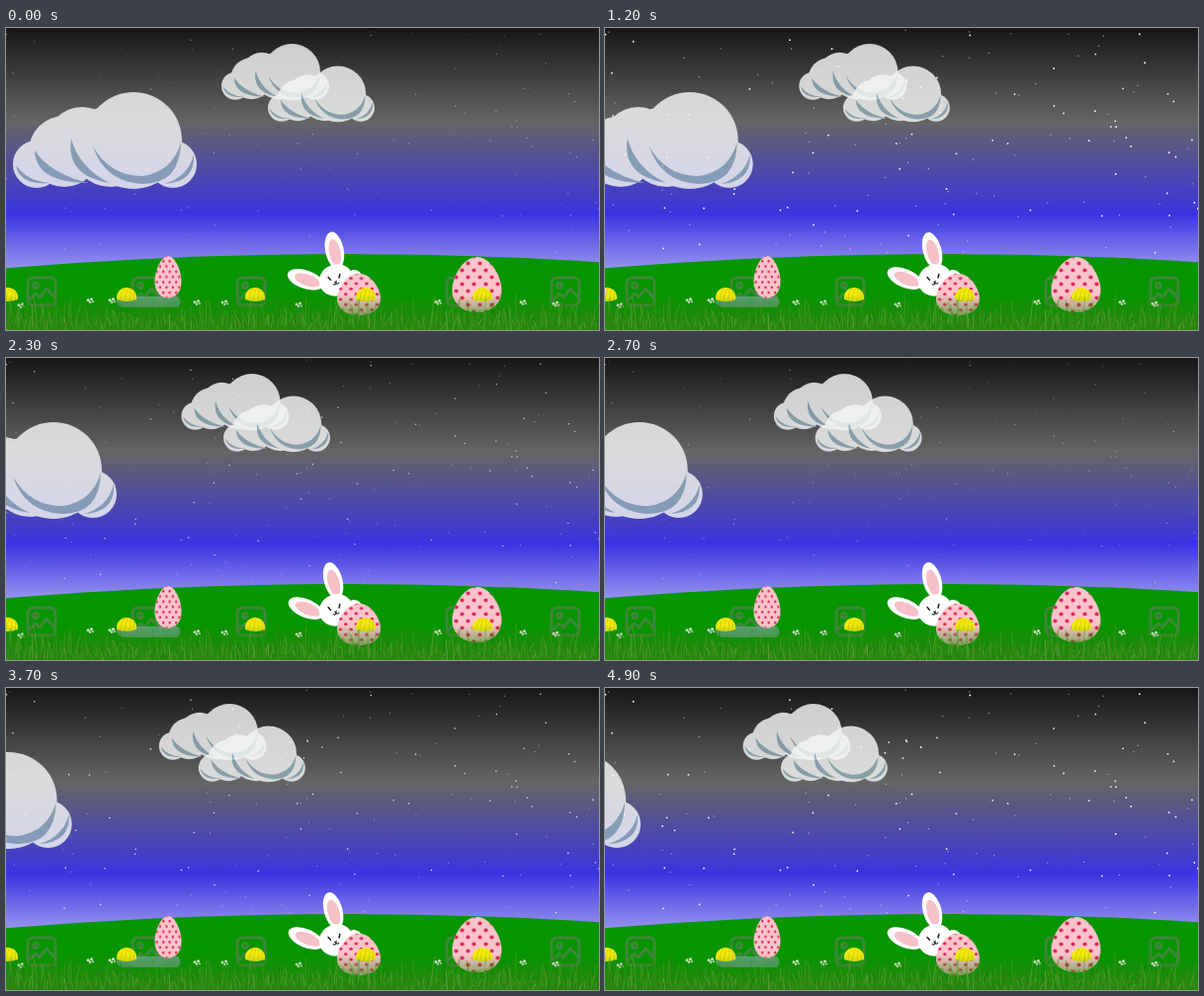
An HTML page that plays this animation: 600x306 px, repeating every 5 s.

```html
<!DOCTYPE html>
<html lang="en">
<head>
<meta charset="utf-8">
<title>Spring night meadow</title>
<style>
  html, body { margin: 0; width: 100%; height: 100%; overflow: hidden; }
  svg { display: block; width: 600px; height: 306px; }
</style>
</head>
<body>
<svg viewBox="0 0 600 306">
  <defs>
    <linearGradient id="sky" x2="0" y2="1">
      <stop stop-color="#181518"/>
      <stop offset=".31" stop-color="#656565"/>
      <stop offset=".615" stop-color="#3a33e0"/>
      <stop offset="1" stop-color="#fff"/>
    </linearGradient>
    <linearGradient id="turf" x2="0" y2="1">
      <stop stop-color="#2a8410" stop-opacity="0"/>
      <stop offset="1" stop-color="#2a8410"/>
    </linearGradient>
    <pattern id="dots" width="12" height="14" x="-6" y="-4" patternUnits="userSpaceOnUse">
      <circle cx="3" cy="3.5" r="2" fill="#d92350"/>
      <circle cx="9" cy="10.5" r="2" fill="#d92350"/>
    </pattern>
    <path id="shell" d="M0-28C14-28 25-8 25 6C25 20 14 28 0 28S-25 20-25 6C-25-8-14-28 0-28Z"/>
    <g id="egg"><use href="#shell" fill="#fbc3cb"/><use href="#shell" fill="url(#dots)"/></g>
    <g id="icon" fill="none" stroke="#6d7d6a" stroke-opacity=".55" stroke-width="3" stroke-linejoin="round">
      <rect x="-14" y="-14" width="28" height="28" rx="5"/>
      <circle cx="-6" cy="-6" r="2.4"/>
      <path d="M-13 9L-6 2L-2 6L5-3L13 6"/>
    </g>
    <g id="bloom">
      <path d="M-10 5C-11-3-5-7 0-7S11-3 10 5Q0 9-10 5Z" fill="#f3ea0c"/>
      <path d="M-6 5Q-6-2-2-6M-2 6Q-1-1 1-6M3 6Q4 0 4-5M7 5Q8 1 7-3" fill="none" stroke="#cfc20a" stroke-width=".7"/>
    </g>
    <g id="daisy" fill="#eef3ea">
      <circle cx="-2" r="1.5"/><circle cx="1.5" cy="-1" r="1.5"/><circle cy="2" r="1.3"/><circle cx="3" cy="1.5" r="1"/>
    </g>
    <g id="ear">
      <ellipse cy="-19" rx="9.3" ry="19" fill="#fff"/>
      <ellipse cy="-17" rx="5.8" ry="13.5" fill="#f6c0c8"/>
    </g>
    <g id="cloud">
      <g fill="#f4f5f5">
        <circle cx="31" cy="138" r="24"/>
        <circle cx="59" cy="125" r="36"/>
        <circle cx="77" cy="116" r="36"/>
        <circle cx="106" cy="120" r="41"/>
        <circle cx="129" cy="114" r="49"/>
        <circle cx="169" cy="138" r="24"/>
      </g>
      <path fill="#92aeba" d="M10 139Q14 160 46 157Q22 156 10 139Z
        M29 124Q30 157 84 157Q45 148 29 124Z
        M66 112Q60 150 105 157Q74 142 66 112Z
        M88 120Q105 150 138 150Q168 146 177 116Q176 158 138 158Q100 156 88 120Z
        M190 128Q192 156 160 158Q184 151 190 128Z"/>
    </g>
  </defs>

  <rect width="600" height="306" fill="url(#sky)"/>
  <g id="sparkle" fill="none" stroke="#fff" stroke-linecap="round">
    <path id="stars"/>
    <path id="faint" stroke-opacity=".7"/>
  </g>
  <g id="clouds"></g>

  <circle cx="342" cy="4329" r="4100" fill="#079500"/>
  <g id="icons"></g>
  <path d="M112 275Q118 270 130 272L174 272Q179 278 174 283H118Q111 281 112 275Z" fill="#78a5a0" opacity=".7"/>
  <use href="#egg" transform="translate(164 252.5) scale(.54 .76)"/>

  <use id="earUp" href="#ear"/>
  <use id="earSide" href="#ear"/>
  <ellipse cx="354" cy="249" rx="6" ry="3.5" fill="#fff" transform="rotate(25 354 249)"/>
  <ellipse cx="334" cy="255.5" rx="17.5" ry="16" fill="#fff" transform="rotate(-20 334 255)"/>
  <g fill="none" stroke="#24202a" stroke-width="1.6" stroke-linecap="round" transform="translate(333 255) rotate(-15)">
    <path d="M-6-4L-4.5-1M6-4L4.5-1"/>
    <path d="M-3 4Q-1 6 0 3Q1 6 3 4M-1 2H1" stroke-width="1.1"/>
  </g>
  <use href="#egg" transform="translate(357 270) scale(.88 .76)"/>
  <use href="#egg" transform="translate(476.5 260)"/>
  <g id="flowers"></g>
  <rect y="270" width="600" height="36" fill="url(#turf)"/>
  <g id="grass" fill="none" stroke-linecap="round"></g>
</svg>
<script>
const el = id => document.getElementById(id);

let seed = 11;
const rand = (lo = 0, hi = 1) => {
  seed = (seed * 16807) % 2147483647;
  return lo + (hi - lo) * seed / 2147483647;
};
const repeat = (n, make) => Array.from({ length: n }, (_, i) => make(i)).join('');
const place = (name, x, y) => `<use href="#${name}" x="${x}" y="${y}"/>`;

const scatter = n => repeat(n, () => `M${rand(0, 600)} ${rand(2, 228)}h.01`);
el('stars').setAttribute('d', scatter(80));
el('faint').setAttribute('d', scatter(80));

const clouds = [
  { x: 218, y: 16, scale: .585, speed: .5 },
  { x: 265, y: 38.5, scale: .58, speed: .555 },
  { x: 7, y: 65, scale: 1, speed: 1 },
];
el('clouds').innerHTML = repeat(clouds.length, () => '<use href="#cloud" opacity=".82"/>');

el('icons').innerHTML = repeat(6, i => place('icon', 36 + i * 106, 267));
el('flowers').innerHTML =
  [2, 122, 252, 364, 482].map(x => place('bloom', x, 270)).join('') +
  [15, 85, 107, 193, 221, 296, 437, 523, 556].map(x => place('daisy', x, rand(275, 281))).join('');

const greens = ['#4f9a2c', '#2f8a14', '#6a9f48', '#1f7a0c', '#3f9a1e'];
el('grass').innerHTML = repeat(600, i => {
  const x = i + rand(-2, 2), base = rand(298, 308), height = 6 + 30 * rand() * rand(), bend = rand(-4, 4);
  return `<path d="M${x} ${base}q0 ${-height * .6} ${bend} ${-height}" stroke="${greens[i % 5]}"
    stroke-width="${rand(.5, 1.2)}" opacity="${rand(.5, .9)}"/>`;
});

function draw(ms) {
  const tick = Math.floor(ms / 100);
  const step = tick - (tick >= 43) - (tick >= 47); // two short holds
  const drift = 3.7 * step - .0077 * step ** 2;
  clouds.forEach(({ x, y, scale, speed }, i) => el('clouds').children[i].setAttribute('transform',
    `translate(${x - drift * speed} ${y}) scale(${scale}) translate(-7 -65)`));

  const glow = Math.abs(Math.sin((step + 2) / 31 * Math.PI));
  el('stars').setAttribute('stroke-width', 1 + .8 * glow);
  el('faint').setAttribute('stroke-width', .7 + .5 * glow);
  el('sparkle').setAttribute('opacity', .4 + .6 * glow);

  const spread = 4 * Math.max(0, 1 - step / 7);
  el('earUp').setAttribute('transform', `translate(336 244) rotate(${spread - 15})`);
  el('earSide').setAttribute('transform', `translate(321 261) rotate(${-67 - spread})`);
}

const start = performance.now();
function loop() {
  draw((performance.now() - start) % 5000);
  requestAnimationFrame(loop);
}
loop();
</script>
</body>
</html>
```
